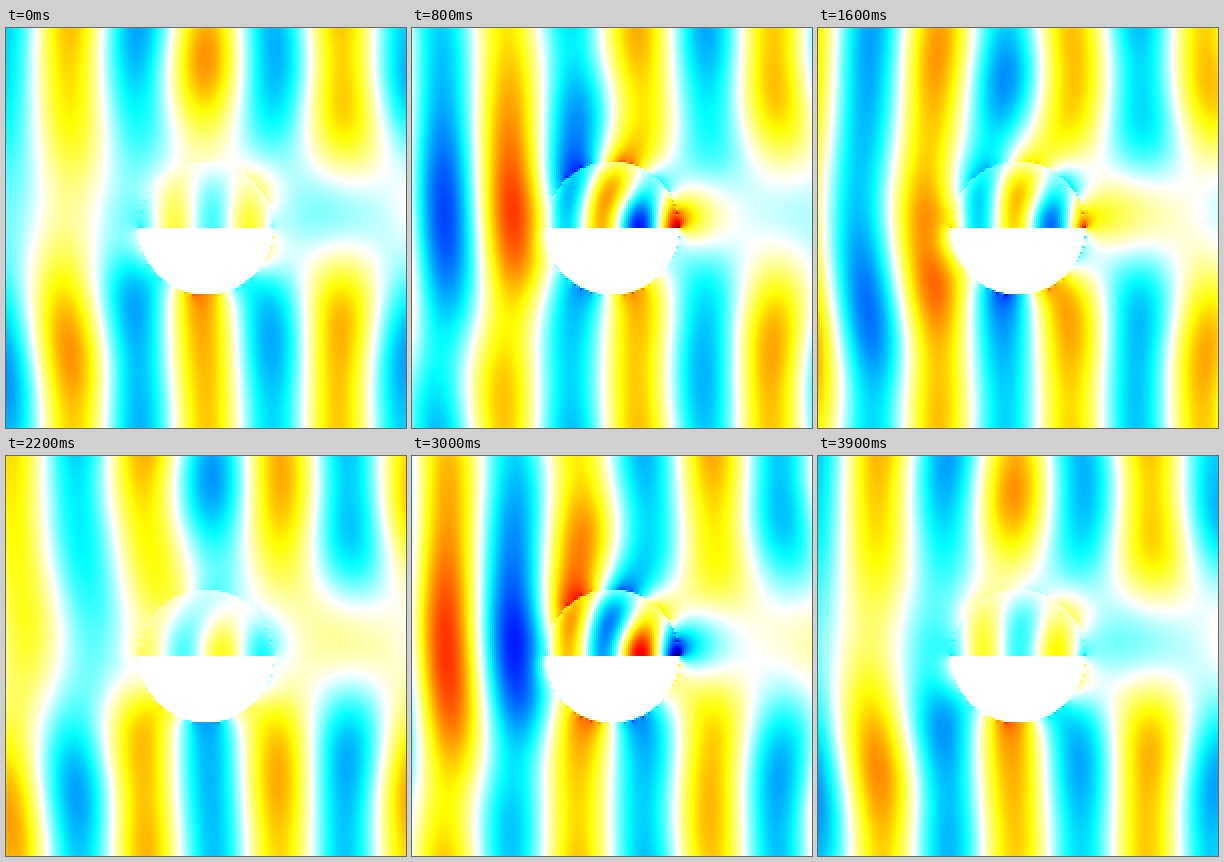
An HTML page with a canvas that plays this animation: 400x400 px, repeating every 4000 ms.

```html
<!DOCTYPE html>
<html lang="en">
<head>
<meta charset="utf-8">
<title>Wave scattering</title>
<style>
  html, body { margin: 0; width: 100%; height: 100%; overflow: hidden; background: #fff; }
  canvas { display: block; width: 400px; height: 400px; image-rendering: pixelated; }
</style>
</head>
<body>
<canvas id="view" width="200" height="200"></canvas>
<script>
// Plane wave on a cylinder: upper half dielectric, lower half conductor.
// The vertical electric field is solved once on a grid, then animated as a harmonic.
const SIZE = 200, PAD = 30, W = SIZE + 2 * PAD;
const WAVELENGTH = SIZE / 3, RADIUS = WAVELENGTH / 2, EPSILON = 3.45;
const STEPS = 96, PERIODS = 10;               // time steps per period, periods to settle
const LOOP = 4000, FRAME = 100, MAX = 3;
const TAU = 2 * Math.PI, dt = WAVELENGTH / STEPS;

const grid = () => new Float64Array(W * W);

function inversePermittivity(x, y) {
  if (Math.hypot(x, y) >= RADIUS) return 1;
  return y < 0 ? 1 / EPSILON : 0;
}

function absorption(i) {
  const depth = Math.max(0, PAD - i, i - (W - 1 - PAD)) / PAD;
  return 0.4 * depth ** 3;
}

const incident = (x, turns) => Math.cos(TAU * (x / WAVELENGTH - turns));

function solve() {
  const ex = grid(), ey = grid(), h = grid();           // scattered field
  const invX = grid(), invY = grid(), damp = grid();
  const wave = new Float64Array(W), change = new Float64Array(W);

  for (let j = 0, p = 0; j < W; j++) {
    for (let i = 0; i < W; i++, p++) {
      const x = i + 0.5 - W / 2, y = j - W / 2;
      invY[p] = inversePermittivity(x, y + 0.5);
      invX[p] = inversePermittivity(x + 0.5, y);
      damp[p] = Math.exp(-dt * (absorption(i) + absorption(j)));
    }
  }

  function step(n) {
    const ramp = Math.min(1, n / (2 * STEPS));
    for (let i = 0; i < W; i++) {
      const next = ramp * incident(i + 0.5 - W / 2, n / STEPS);
      change[i] = next - wave[i];
      wave[i] = next;
    }
    for (let j = 1; j < W - 1; j++) {
      for (let i = 1, p = j * W + 1; i < W - 1; i++, p++) {
        h[p] = damp[p] * (h[p] + dt * (ex[p + W] - ex[p] - ey[p + 1] + ey[p]));
      }
    }
    for (let j = 1; j < W - 1; j++) {
      for (let i = 1, p = j * W + 1; i < W - 1; i++, p++) {
        ex[p] = damp[p] * (ex[p] + dt * invX[p] * (h[p] - h[p - W]));
        ey[p] = damp[p] * (ey[p] + dt * invY[p] * (h[p - 1] - h[p])) - (1 - invY[p]) * change[i];
      }
    }
  }

  function snapshot() {
    const field = new Float64Array(SIZE * SIZE);
    for (let q = 0; q < field.length; q++) {
      const i = q % SIZE + PAD, j = Math.floor(q / SIZE) + PAD;
      field[q] = ey[j * W + i] + wave[i];
    }
    return field;
  }

  let n = 0;
  while (n < PERIODS * STEPS) step(++n);
  const cosine = snapshot();
  while (n < (PERIODS + 0.25) * STEPS) step(++n);
  return [cosine, snapshot()];
}

const [cosine, sine] = solve();
const ctx = document.getElementById("view").getContext("2d");
const image = ctx.createImageData(SIZE, SIZE);

function draw(phase) {
  const c = Math.cos(phase), s = Math.sin(phase), px = image.data;
  for (let q = 0, o = 0; q < cosine.length; q++, o += 4) {
    const v = (cosine[q] * c + sine[q] * s) / MAX, a = Math.abs(v);
    // white, yellow, red, black for positive; white, cyan, blue, black for negative
    const first = 255 * (1 - a / 0.25);
    const second = 255 * Math.min(1, 1 - (a - 0.25) / 0.375);
    const third = 255 * Math.min(1, 1 - (a - 0.625) / 0.375);
    px[o] = v > 0 ? third : first;
    px[o + 1] = second;
    px[o + 2] = v > 0 ? first : third;
    px[o + 3] = 255;
  }
  ctx.putImageData(image, 0, 0);
}

let shown = 0;
draw(0);
const start = performance.now();

function tick() {
  const frame = Math.floor((performance.now() - start) % LOOP / FRAME);
  if (frame !== shown) draw(TAU * frame * FRAME / LOOP);
  shown = frame;
  requestAnimationFrame(tick);
}
requestAnimationFrame(tick);
</script>
</body>
</html>
```
